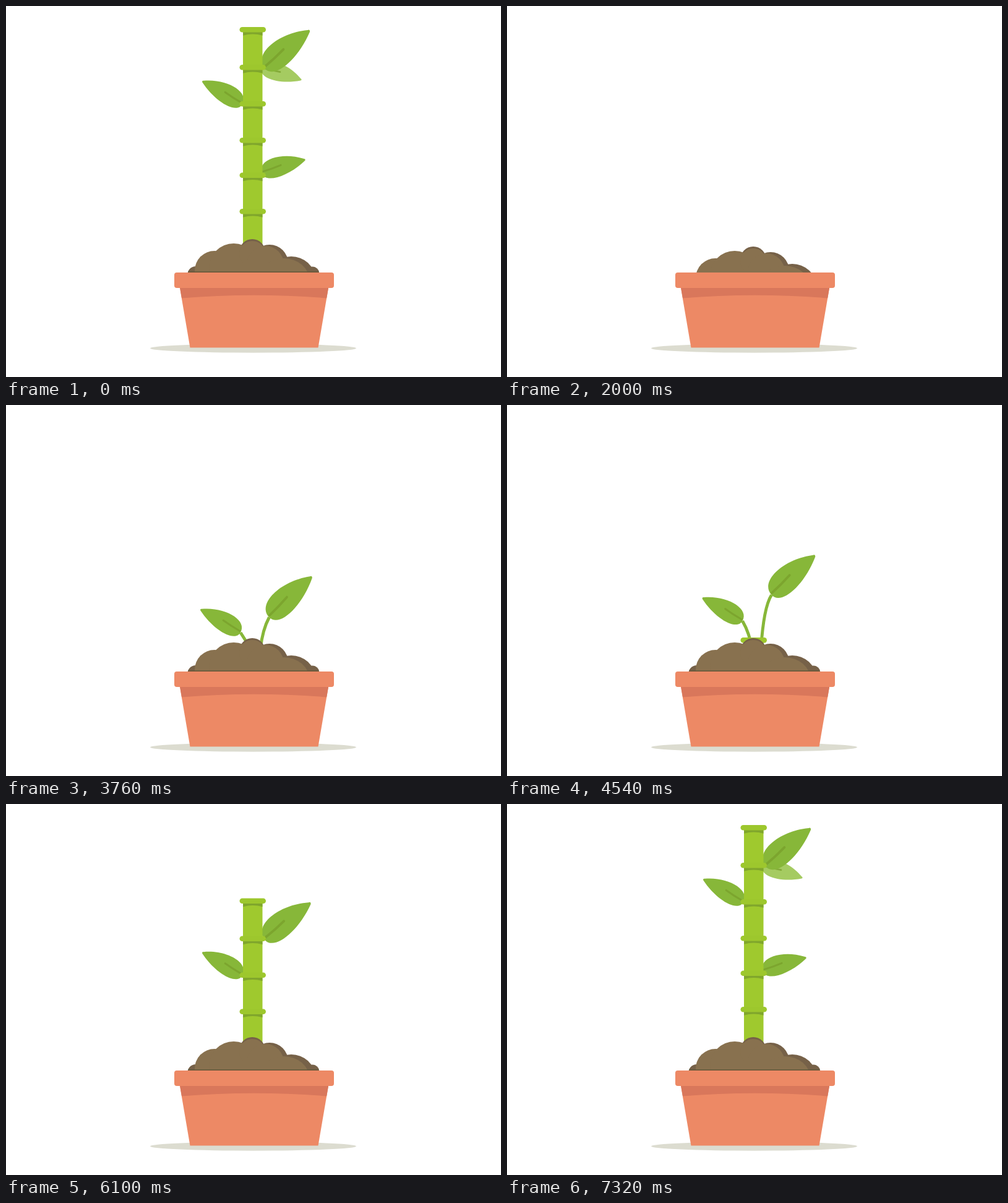
Recreate the animation shown at these times as an HTML page. Size 800x600 px, loop 8720 ms.

```html
<!DOCTYPE html>
<html lang="en">
<head>
<meta charset="utf-8">
<title>Growing bamboo</title>
<style>
  html, body { margin: 0; width: 100%; height: 100%; overflow: hidden; background: #fff; }
  svg { display: block; width: 100%; height: 100%; }
</style>
</head>
<body>
<svg viewBox="0 0 800 600">
  <defs>
    <clipPath id="aboveRim"><rect width="800" height="431.5"/></clipPath>
    <g id="leaf">
      <path d="M0 0C0 -30 54 -31 95 -2.5Q99 -1 96 2C50 25 0 24 0 0Z"/>
      <path d="M3 -2Q24 -2 44 -4" fill="none" stroke="#789f2b" stroke-opacity=".75" stroke-width="4" stroke-linecap="round"/>
    </g>
    <g id="joint">
      <path d="M383 3H414.5V9.5Q399 5 383 9.5Z" fill="#80a62c"/>
      <rect x="377.5" y="-4.3" width="42.5" height="8.6" rx="4.3" fill="#9dc72d"/>
    </g>
  </defs>

  <ellipse id="ground" cx="399.5" cy="553.5" rx="166.5" ry="7.2" fill="#dcdcd0"/>

  <g clip-path="url(#aboveRim)">
    <ellipse id="seed" rx="5" ry="6" fill="#766148"/>
    <g id="plant" fill="#87b739">
      <g id="stems" fill="none" stroke="#87b739" stroke-width="5">
        <path id="stem1"/>
        <path id="stem2"/>
      </g>
      <use id="leaf4" href="#leaf" fill="#a5cb61"/>
      <use id="leaf3" href="#leaf"/>
      <use id="leaf2" href="#leaf"/>
      <use id="leaf1" href="#leaf"/>
      <g id="bamboo"><rect x="383" width="31.5" height="400" fill="#9fc92e"/></g>
    </g>
    <g id="soil" fill="#88714f">
      <g fill="#766148">
        <circle cx="426" cy="416" r="30"/>
        <ellipse cx="461" cy="440" rx="38" ry="35"/>
        <circle cx="495" cy="433" r="11.5"/>
        <circle cx="398" cy="398" r="21"/>
        <circle cx="307" cy="435" r="14"/>
      </g>
      <circle cx="337" cy="428" r="32"/>
      <circle cx="368" cy="424" r="40"/>
      <circle cx="398" cy="401" r="21"/>
      <circle cx="419" cy="418" r="30"/>
      <ellipse cx="449" cy="443" rx="41" ry="35"/>
      <rect x="337" y="416" width="112" height="60"/>
      <rect x="294" y="429.5" width="211" height="2" fill="#645638"/>
    </g>
  </g>

  <path id="pot" d="M279.3 446H522.7L504.5 552.5H297.5Z" fill="#ed8965"/>
  <path id="band" d="M281 455H521.2L518.2 472.5Q400 463 284 472.5Z" fill="#d9775b"/>
  <rect id="rim" x="272" y="431" width="258" height="25" rx="4" fill="#ed8965"/>
</svg>
<script>
const LOOP = 8720;
const $ = id => document.getElementById(id);
const set = (id, name, value) => $(id).setAttribute(name, value);
const show = (id, on) => set(id, "visibility", on ? "visible" : "hidden");
const mix = (a, b, p) => a + (b - a) * p;
const progress = (t, from, to) => Math.min(1, Math.max(0, (t - from) / (to - from)));
const easeOut = (p, power = 3) => 1 - (1 - p) ** power;
const easeInOut = p => p * p * (3 - 2 * p);

for (const y of [0, 61, 120, 179, 235.5, 294]) {
  const joint = document.createElementNS("http://www.w3.org/2000/svg", "use");
  joint.setAttribute("href", "#joint");
  joint.setAttribute("y", y);
  $("bamboo").append(joint);
}

function placeLeaf(id, x, y, angle, scale, flip = 1) {
  set(id, "transform", `translate(${x} ${y}) rotate(${angle}) scale(${scale} ${scale * flip})`);
}

function placeStem(id, rootX, x, y) {
  set(id, "d", `M${rootX} 395Q${mix(rootX, x, .25)} ${y + 20} ${x} ${y}`);
}

function dropIn(id, t, from, to) {
  const p = easeOut(progress(t, from, to));
  set(id, "transform", `translate(0 ${mix(-37, 0, p)})`);
  set(id, "opacity", p);
}

function drawPot(t) {
  set("ground", "opacity", easeOut(progress(t, 970, 1260)));
  dropIn("pot", t, 970, 1260);
  dropIn("rim", t, 1430, 1720);
  set("band", "opacity", progress(t, 1430, 1720));

  const depth = mix(55, 0, easeOut(progress(t, 1920, 2260), 5.6));
  set("soil", "transform", `translate(0 ${depth})`);
  show("soil", t >= 1920);

  const toss = progress(t, 2550, 2860);
  set("seed", "transform", `translate(${mix(207, 398, toss)} ${240 - 70 * toss + 215 * toss * toss})`);
  show("seed", t >= 2560 && toss < 1);
}

function drawPlant(t) {
  const rise = mix(0, -173, easeInOut(progress(t, 5910, 6420)));
  const top = mix(390, 211.3, progress(t, 4500, 5260));
  set("bamboo", "transform", `translate(0 ${top + rise})`);
  show("bamboo", t >= 4500);

  // Each sprout shoots out of the soil, then drifts up to its joint.
  const shoot1 = easeOut(progress(t, 2880, 3140)), drift1 = progress(t, 3140, 5260);
  const x1 = mix(395, 415, shoot1) + 3 * drift1 + 12 * Math.sin(Math.PI * drift1);
  const y1 = mix(484, 372, shoot1) - 98 * drift1;
  const shoot2 = easeOut(progress(t, 3440, 3760)), drift2 = progress(t, 3760, 5260);
  const x2 = mix(400, 379, shoot2) + 3 * drift2;
  const y2 = mix(470, 368, shoot2) - 36 * drift2;

  placeStem("stem1", mix(411, 402, progress(t, 4500, 5100)), x1, y1);
  placeStem("stem2", 396, x2, y2);
  show("stems", t >= 2880 && t < 5260);
  show("leaf1", t >= 2880);
  for (const id of ["stem2", "leaf2"]) set(id, "opacity", t >= 3440 ? 1 : 0);

  const swing = Math.sin(Math.PI * progress(t, 5920, 7000));
  placeLeaf("leaf1", x1, y1 + rise, mix(-80, -44, shoot1) + 3.7 * drift1 ** 2 + 3 * swing, .98);
  placeLeaf("leaf2", x2, y2 + rise, mix(-95, -150, shoot2), .77, -1);
  placeLeaf("leaf3", 413, 443 + rise, -17 - 5.5 * swing, .76 * easeOut(progress(t, 6100, 6440)));
  placeLeaf("leaf4", 413, 274 + rise, 16, .69 * easeOut(progress(t, 6480, 6900)));
}

const start = performance.now();
function frame() {
  const now = (performance.now() - start) % LOOP;
  const t = now < 200 ? now + LOOP : now; // the grown plant lingers into the next loop
  drawPot(t);
  drawPlant(t);
  requestAnimationFrame(frame);
}
frame();
</script>
</body>
</html>
```
